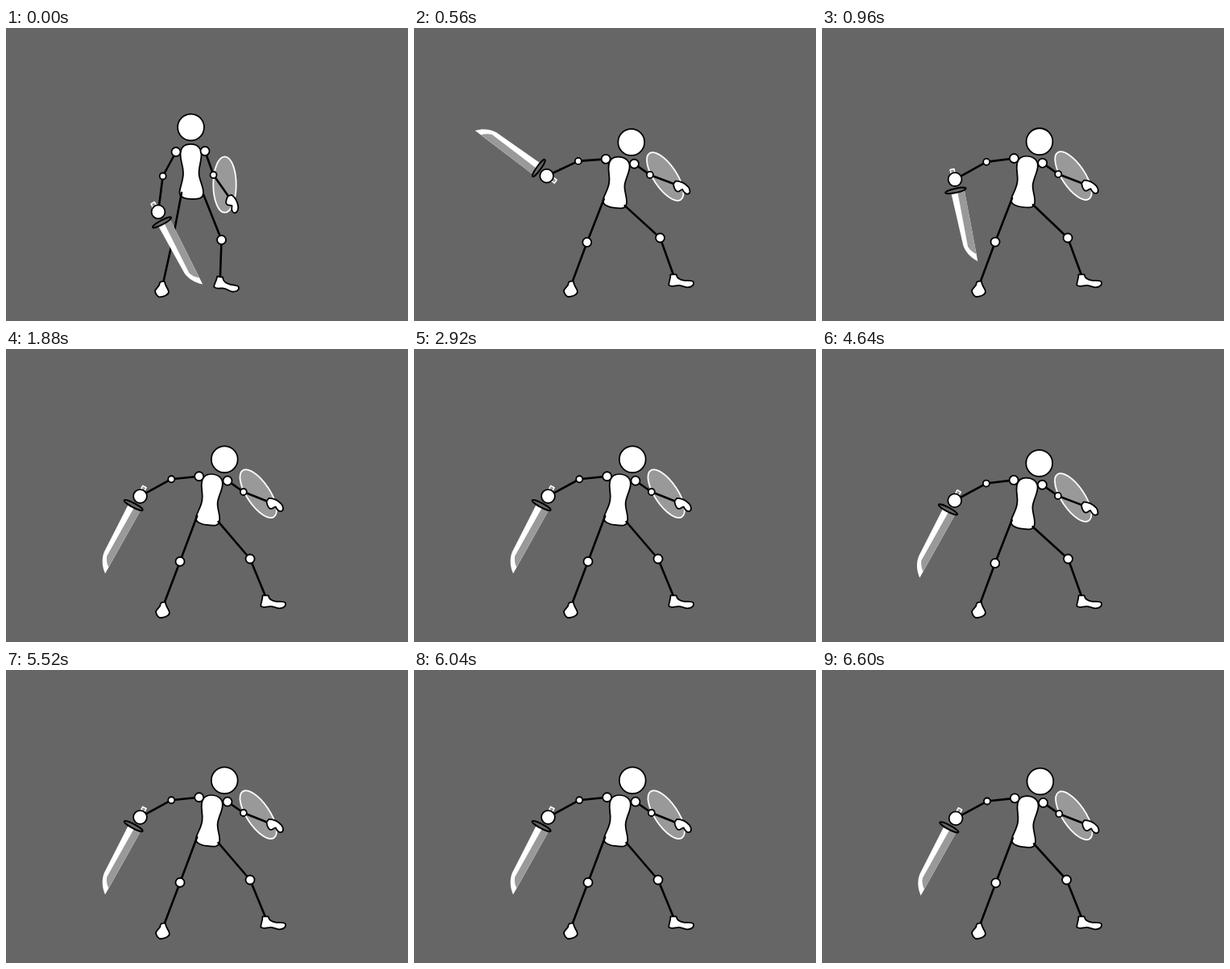
An HTML page without scripts that plays this animation: 499 by 363 pixels, repeating every 6640 ms.

```html
<!DOCTYPE html>
<html lang="en">
<head>
<meta charset="utf-8">
<title>Swordsman</title>
<style>
/* s: rest to stance, b: breath, r: sword angle, u: arm lift */
@property --s { syntax: "<number>"; inherits: true; initial-value: 0 }
@property --b { syntax: "<number>"; inherits: true; initial-value: 0 }
@property --r { syntax: "<number>"; inherits: true; initial-value: -28 }
@property --u { syntax: "<number>"; inherits: true; initial-value: 0 }

html, body { margin: 0; width: 100%; height: 100%; overflow: hidden; background: #666 }
svg {
  display: block; width: 499px; height: 363px;
  animation: stance 6640ms linear infinite, breath 6640ms linear infinite, swing 6640ms linear infinite;
}

@keyframes stance {
  0%, 3.01% { --s: 0 }
  7.83%, 100% { --s: 1 }
}
@keyframes breath {
  0% { --b: 0 }
  7.83%, 15.66%, 23.49%, 31.33%, 39.16%, 46.99%, 54.82%, 62.65%, 70.48%, 78.31%, 86.14%, 93.98% {
    --b: 0; animation-timing-function: cubic-bezier(.37, 0, .63, 1);
  }
  11.75%, 19.58%, 27.41%, 35.24%, 43.07%, 50.9%, 58.73%, 66.57%, 74.4%, 82.23%, 90.06% {
    --b: 1; animation-timing-function: cubic-bezier(.37, 0, .63, 1);
  }
  97.89% { --b: 1; animation-timing-function: ease-in }
  100% { --b: .44 }
}
@keyframes swing {
  0%, 3.01% { --r: -28; --u: 0 }
  7.83% { --r: 110; --u: .2 }
  10.24% { --r: 172; --u: 1 }
  11.45% { --r: 165; --u: .8 }
  12.65% { --r: 131; --u: 0 }
  13.25% { --r: 42; --u: 0 }
  13.86% { --r: 5; --u: 0 }
  14.46%, 14.9% { --r: -12; --u: -.08; animation-timing-function: ease-in-out }
  17.47%, 100% { --r: 28; --u: 0 }
}

/* joint = rest + shift into stance + breath */
.man {
  --headx: calc(229.5 + 40.1 * var(--s) + 1.9 * var(--b));
  --heady: calc(123 + 18.9 * var(--s) - 5.9 * var(--b));
  --topx: calc(229.5 + 26.7 * var(--s) + 1.5 * var(--b));
  --topy: calc(143.8 + 16.4 * var(--s) - 5.7 * var(--b));

  --sh1x: calc(211 + 27 * var(--s) + 1.9 * var(--b));
  --sh1y: calc(153.5 + 9.2 * var(--s) - 5.7 * var(--b));
  --el1x: calc(194.7 + 9.1 * var(--s) + 1.7 * var(--b));
  --el1y: calc(183.5 - 16.6 * var(--s) - 6.5 * var(--b) - 4 * var(--u));
  --ha1x: calc(189 - 24.4 * var(--s) + 2.2 * var(--b));
  --ha1y: calc(227.8 - 39.7 * var(--s) - 6.5 * var(--b) - 11 * var(--u));

  --sh2x: calc(247 + 26.3 * var(--s) + 1.9 * var(--b));
  --sh2y: calc(152.5 + 16.1 * var(--s) - 6.2 * var(--b));
  --el2x: calc(257.5 + 35.3 * var(--s) + 2.3 * var(--b));
  --el2y: calc(182 + .3 * var(--s) - 6.1 * var(--b));
  --ha2x: calc(277.5 + 47.3 * var(--s) + 1.8 * var(--b));
  --ha2y: calc(210.5 - 16.1 * var(--s) - 5.7 * var(--b));
  --shieldx: calc(271.5 + 40.1 * var(--s) + 1.8 * var(--b));
  --shieldy: calc(194 - 9.7 * var(--s) - 5.8 * var(--b));

  --hip1x: calc(218 + 17.6 * var(--s) + 1.8 * var(--b));
  --hip1y: calc(204 + 8.3 * var(--s) - 6.1 * var(--b));
  --kn1x: calc(207 + 7.7 * var(--s) + 1.5 * var(--b));
  --kn1y: calc(262 + 3.6 * var(--s) - 2.7 * var(--b));
  --an1x: calc(195 + 1 * var(--s));
  --an1y: calc(316.3 - .3 * var(--s));

  --hip2x: calc(245 + 16.5 * var(--s) + 2.3 * var(--b));
  --hip2y: calc(206 + 14.6 * var(--s) - 7.6 * var(--b));
  --kn2x: calc(267.5 + 38.2 * var(--s) - 3.1 * var(--b));
  --kn2y: calc(262.5 - 2.5 * var(--s));
  --an2x: calc(265.8 + 56.7 * var(--s));
  --an2y: calc(310.3 - 3 * var(--s));
}

.at { transform: matrix(1, 0, 0, 1, var(--x), var(--y)) }
.bone {
  --dx: calc(var(--x2) - var(--x));
  --dy: calc(var(--y2) - var(--y));
  transform: matrix(var(--dx), var(--dy), calc(0 - var(--dy)), var(--dx), var(--x), var(--y));
  vector-effect: non-scaling-stroke;
  stroke-width: 2.6; stroke-linecap: round;
}
.man { fill: #fff; stroke: #000; stroke-width: 1.8; stroke-linejoin: round }

.torso { transform: rotate(calc(8deg * var(--s))) scaleY(calc(1 - .07 * var(--s))) }
.shield { fill: #999; stroke: #fff; transform: rotate(calc(-34deg * var(--s))) }
.palm { transform: rotate(calc(61deg - 37deg * var(--s))) }
.toes { transform: rotate(calc(8deg - 8deg * var(--s))) }
.sword { transform: rotate(calc(1deg * var(--r))) }

.head { --x: var(--headx); --y: var(--heady) }
.top { --x: var(--topx); --y: var(--topy) }
.guard { --x: var(--shieldx); --y: var(--shieldy) }
.sh1 { --x: var(--sh1x); --y: var(--sh1y); --x2: var(--el1x); --y2: var(--el1y) }
.el1 { --x: var(--el1x); --y: var(--el1y); --x2: var(--ha1x); --y2: var(--ha1y) }
.ha1 { --x: var(--ha1x); --y: var(--ha1y) }
.sh2 { --x: var(--sh2x); --y: var(--sh2y); --x2: var(--el2x); --y2: var(--el2y) }
.el2 { --x: var(--el2x); --y: var(--el2y); --x2: var(--ha2x); --y2: var(--ha2y) }
.ha2 { --x: var(--ha2x); --y: var(--ha2y) }
.hip1 { --x: var(--hip1x); --y: var(--hip1y); --x2: var(--kn1x); --y2: var(--kn1y) }
.kn1 { --x: var(--kn1x); --y: var(--kn1y); --x2: var(--an1x); --y2: var(--an1y) }
.an1 { --x: var(--an1x); --y: var(--an1y) }
.hip2 { --x: var(--hip2x); --y: var(--hip2y); --x2: var(--kn2x); --y2: var(--kn2y) }
.kn2 { --x: var(--kn2x); --y: var(--kn2y); --x2: var(--an2x); --y2: var(--an2y) }
.an2 { --x: var(--an2x); --y: var(--an2y) }
</style>
</head>
<body>
<svg viewBox="0 0 499 363">
<g class="man">
  <g class="at guard"><ellipse class="shield" rx="14.2" ry="34.7"/></g>

  <g class="at top"><path class="torso" d="M0 0C8 0 13 5 13 13S10 28 10 36 15.5 52 15.5 60 9 68 .5 68-14 66-14 60-9.5 46-9.5 36-13 22-13 13-8 0 0 0Z"/></g>
  <circle class="at head" r="16.4"/>

  <line class="bone hip2" x2="1"/>
  <line class="bone kn2" x2="1"/>
  <circle class="at kn2" r="5.5"/>
  <g class="at an2"><path class="toes" d="M-4-2L3-2C4 3 8 5 13 5.5 17 6 22 5 24 7 26 10 23 14 17 14 12 14 10 11.5 6 11.5 2 11.5-2 14-6 11.5-7 8-4 5-4-2Z"/></g>

  <line class="bone hip1" x2="1"/>
  <line class="bone kn1" x2="1"/>
  <circle class="at kn1" r="5.5"/>
  <path class="at an1" d="M-4-1Q-1-3 2-2C2 3 7 7 7 11 6 15 0 17-5 17-7 16-9 14-10 10-10 6-4 5-4-1Z"/>

  <line class="bone sh2" x2="1"/>
  <line class="bone el2" x2="1"/>
  <circle class="at sh2" r="5.5"/>
  <circle class="at el2" r="4"/>
  <g class="at ha2"><path class="palm" d="M-2-4C4-7 10-6 15-4 19-2 21 2 19 4 17 6 13 5 10 2 8 3 8 7 4.5 7 2 7-2 3-3 0Z"/></g>

  <line class="bone sh1" x2="1"/>
  <line class="bone el1" x2="1"/>
  <circle class="at sh1" r="5.5"/>
  <circle class="at el1" r="4"/>
  <g class="at ha1">
    <g class="sword">
      <path d="M-8.2 14H8.7L6.6 105C-1 99-6 91-7 82Z" stroke="none"/>
      <path d="M0 14H8.7L6.7 96Q1 92-1.7 85Z" fill="#999" stroke="none"/>
      <path d="M-3.3-6V-13H1.7V-6" fill="#999" stroke="#fff" stroke-width="1.5"/>
      <ellipse cx="-2.1" cy="13.7" rx="13" ry="2.6" fill="#666" stroke-width="2"/>
    </g>
    <circle r="8.4"/>
  </g>
</g>
</svg>
</body>
</html>
```
